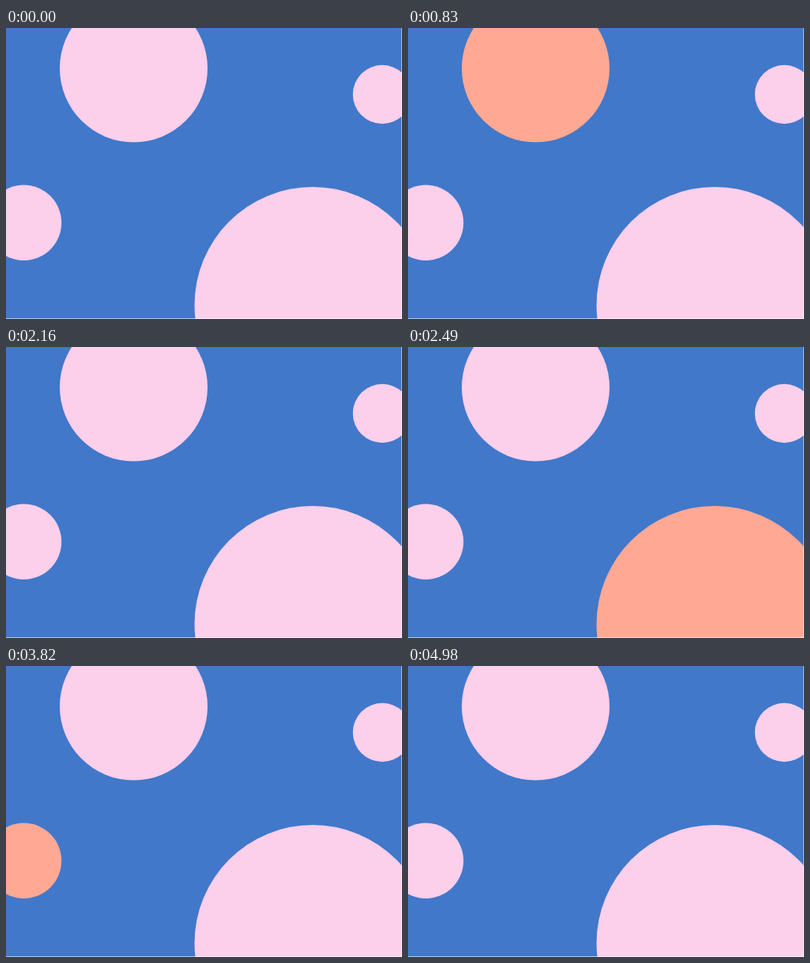
Write an HTML page with a canvas that moves like this. It is 501x368 px and loops after 5810 ms.

```html
<!DOCTYPE html>
<html lang="en">
<head>
<meta charset="utf-8">
<title>Blinking circles</title>
<style>
  html, body { margin: 0; width: 100%; height: 100%; overflow: hidden; background: #fff; }
  canvas { display: block; }
</style>
</head>
<body>
<canvas id="stage" width="501" height="368"></canvas>
<script>
const ctx = document.getElementById('stage').getContext('2d');
const BLUE = '#4178ca', PINK = '#fccfeb', ORANGE = '#ffa894';
const STEP = 830;

// Each circle turns orange during its own step of the loop.
const circles = [
  { x: 161.5, y: 51, r: 93.5, litStep: 1 },
  { x: 388, y: 350.5, r: 149.5, litStep: 3 },
  { x: 22.5, y: 246.3, r: 47.7, litStep: 4 },
  { x: 476, y: 84, r: 37.2, litStep: 5 },
];

function fillRect(color, x, y, w, h) {
  ctx.fillStyle = color;
  ctx.fillRect(x, y, w, h);
}

function draw(step) {
  fillRect(BLUE, 0, 0, 501, 368);
  for (const { x, y, r, litStep } of circles) {
    ctx.fillStyle = step === litStep ? ORANGE : PINK;
    ctx.beginPath();
    ctx.arc(x, y, r, 0, Math.PI * 2);
    ctx.fill();
  }
  // Soft white edge on the right and bottom.
  fillRect('#fff', 500.5, 0, 1, 368);
  fillRect('#fff', 0, 367.4, 501, 1);
}

const start = performance.now();

function tick() {
  const elapsed = performance.now() - start;
  draw(Math.floor(elapsed / STEP) % 7);
  requestAnimationFrame(tick);
}
tick();
</script>
</body>
</html>
```
